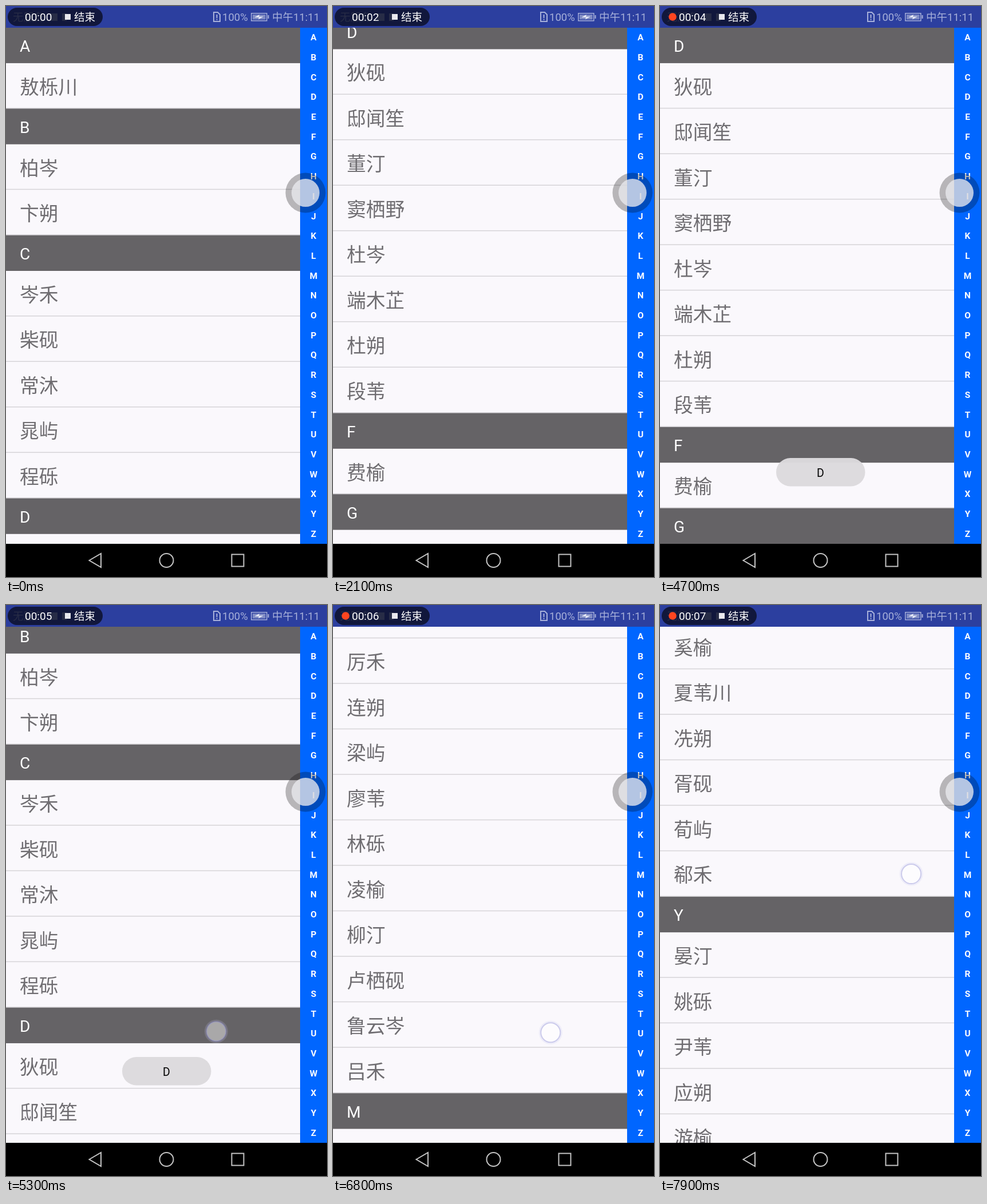
An HTML page with a canvas for the animation above (8000 ms loop, 561 by 998 pixels).

```html
<!DOCTYPE html>
<html lang="zh-CN">
<head>
<meta charset="utf-8">
<style>
html, body { margin: 0; width: 100%; height: 100%; overflow: hidden; background: #000; }
canvas { display: block; }
</style>
</head>
<body>
<canvas id="stage" width="561" height="998"></canvas>
<script>
const ctx = document.getElementById('stage').getContext('2d');
const LOOP = 8000, TOP = 37.6, BOTTOM = 940, HEAD = 62.3, ROW = 79.5;
const FONT = 'Roboto, "Noto Sans CJK SC", "Noto Sans CJK", sans-serif';
const ALPHABET = 'ABCDEFGHIJKLMNOPQRSTUVWXYZ';

const contacts = {
  A: '敖栎川',
  B: '柏岑,卞朔',
  C: '岑禾,柴砚,常沐,晁屿,程砾',
  D: '狄砚,邸闻笙,董汀,窦栖野,杜岑,端木芷,杜朔,段苇',
  F: '费榆',
  G: '龚栖梧,葛汀,耿朔,郜云屿,关 砾',
  H: '郝苇,韩云砾,贺汀,呼栖榆,胡闻屿,花砚,桓北岑,霍朔',
  J: '纪禾,焦屿,靳云苇',
  K: '孔砾,匡汀',
  L: '雷砚,李岑,李榆,李汀,厉禾,连朔,梁屿,廖苇,林砾,凌榆,柳汀,卢栖砚,鲁云岑,吕禾',
  M: '马砾,孟汀,穆榆,穆屿',
  O: '欧砚',
  P: '裴砾,彭苇',
  Q: '秦屿',
  R: '阮栖禾,阮云汀,阮北榆',
  S: '沙砚,邵岑,石砾,时汀,史苇,宋榆,宋屿,苏禾,索朔,孙砚,孙汀',
  T: '汤岑,陶云砾,佟屿,滕苇',
  W: ' 卫北朗,温砚,邬栖禾,巫汀,翁砾',
  X: '奚榆,夏苇川,冼朔,胥砚,荀屿,郗禾',
  Y: '晏汀,姚砾,尹苇,应朔,游榆,郁云岑,袁砚',
  Z: '詹禾,张屿,郑汀,周砾,朱苇,邹榆'
};

const items = [], sectionY = {};
let listY = 0;
for (const [letter, names] of Object.entries(contacts)) {
  sectionY[letter] = listY;
  items.push({ text: letter, y: listY, head: true });
  listY += HEAD;
  for (const text of names.split(',')) {
    items.push({ text, y: listY });
    listY += ROW;
  }
}

// [time, scroll, power]: positive power eases in, negative eases out
const w = sectionY.W, d = sectionY.D;
const scrollKeys = [
  [0, 0], [850, 0], [1300, 211], [1500, 305], [2400, 900, -2.2],
  [2900, 900], [2900, d], [4720, d], [5300, 158], [5340, 112], [5480, 112],
  [5760, 532], [6200, 1346.5, -1.3], [6300, 1420], [6480, 1840],
  [6800, 3700, -1.2], [6950, 4120], [7330, w - 254, -1.3],
  [7400, w - 184.4], [7460, w - 124], [7760, w + 284, -1.2],
  [7900, w + 525.2], [8000, w + 690]
];

// [start, x, y, end, x, y]
const touches = [
  [850, 400, 668, 1500, 433, 360],
  [2700, 550, 158, 3450, 550, 158],
  [4720, 403, 79, 5340, 365, 790],
  [5480, 375, 800, 5760, 420, 380],
  [6300, 380, 750, 6480, 420, 330],
  [6800, 380, 750, 6950, 420, 330],
  [7330, 385, 620, 7460, 398, 489],
  [7760, 432, 640, 7960, 442, 399]
];

const clamp = v => Math.max(0, Math.min(1, v));
const mix = (a, b, u) => a + (b - a) * u;

function scrollAt(t) {
  const i = scrollKeys.findIndex(k => k[0] > t);
  const [t0, y0] = scrollKeys[i - 1], [t1, y1, power = 1] = scrollKeys[i];
  const u = (t - t0) / (t1 - t0);
  return mix(y0, y1, power > 0 ? u ** power : 1 - (1 - u) ** -power);
}

function rect(x, y, width, height, color) {
  ctx.fillStyle = color;
  ctx.fillRect(x, y, width, height);
}

function pill(x, y, width, height, r, color) {
  ctx.fillStyle = color;
  ctx.beginPath();
  ctx.roundRect(x, y, width, height, r);
  ctx.fill();
}

function disc(x, y, r, fill, stroke, line = 2) {
  ctx.beginPath();
  ctx.arc(x, y, r, 0, 7);
  if (fill) { ctx.fillStyle = fill; ctx.fill(); }
  if (stroke) { ctx.strokeStyle = stroke; ctx.lineWidth = line; ctx.stroke(); }
}

function label(text, x, y, size, color, weight = 400, align = 'left') {
  ctx.font = `${weight} ${size}px ${FONT}`;
  ctx.textAlign = align;
  ctx.fillStyle = color;
  ctx.fillText(text, x, y);
}

function poly(points, color, fill) {
  ctx.beginPath();
  points.forEach(([x, y]) => ctx.lineTo(x, y));
  ctx.closePath();
  ctx.strokeStyle = ctx.fillStyle = color;
  ctx.lineWidth = 2;
  fill ? ctx.fill() : ctx.stroke();
}

function drawList(scroll) {
  rect(0, TOP, 514, BOTTOM - TOP, '#faf8fc');
  for (const { text, y, head } of items) {
    const top = TOP + y - scroll;
    if (top > BOTTOM || top + ROW < TOP) continue;
    if (head) {
      rect(0, top, 514, HEAD, '#656366');
      label(text, 24, top + 42.4, 28, '#fff');
    } else {
      rect(0, top + ROW - 1.5, 514, 1.5, '#d6d4d8');
      label(text, 24, top + 53.9, 33.7, '#6f6d71');
    }
  }
}

function drawIndex() {
  rect(514, TOP, 47, BOTTOM - TOP, '#0066ff');
  [...ALPHABET].forEach((c, i) =>
    label(c, 537.5, 60.2 + i * 34.7, 15.5, '#fff', 700, 'center'));
  disc(523.5, 326.5, 35, 'rgba(0,0,0,.27)');
  disc(523.5, 326.5, 24.5, 'rgba(235,235,240,.77)');
}

function drawStatus(t) {
  const ink = '#a7b0da';
  rect(0, 0, 561, 38, '#2c3f9f');
  label('无服务', 12, 26, 18.5, ink);
  rect(77, 13, 13, 13, ink);
  rect(98, 13, 8, 13, ink);
  pill(3, 3, 166, 32, 16, 'rgba(12,15,38,.82)');
  if (t % 1000 >= 500) disc(22, 19, 6.8, '#ff4520');
  label('00:0' + Math.floor(t / 1000), 33, 26, 19, '#fff');
  rect(103, 14, 10, 10, '#e8e8ee');
  label('结束', 119, 26, 18.5, '#fff');

  poly([[363, 11], [370, 11], [374, 15], [374, 27], [363, 27]], ink);
  rect(367.5, 15, 2, 6, ink);
  rect(367.5, 22.5, 2, 2, ink);
  label('100%', 378, 26, 18.5, ink);
  ctx.strokeStyle = ink;
  ctx.lineWidth = 1.5;
  ctx.strokeRect(428.8, 12.8, 27, 13);
  rect(431, 15, 22.6, 8.6, '#7f8bc4');
  rect(457.5, 16, 2, 6, ink);
  poly([[434, 20], [443, 15], [442, 18.5], [450, 18.5], [441, 23.5], [442, 20]], '#e4e7f5', true);
  label('中午11:11', 465, 26, 18.5, ink);
}

function drawNav() {
  const ink = '#c4c4c4';
  rect(0, BOTTOM, 561, 58, '#000');
  poly([[145.5, 969], [166, 957], [166, 981]], ink);
  disc(280.5, 969, 12, null, ink);
  poly([[394.5, 958.5], [415.5, 958.5], [415.5, 979.5], [394.5, 979.5]], ink);
}

function drawToast(t) {
  ctx.globalAlpha = clamp((t - 2900) / 150) * clamp((5800 - t) / 200);
  pill(203, 790, 155.5, 49.5, 24.7, 'rgba(220,218,221,.97)');
  label('D', 280.3, 822.5, 19.5, '#000', 400, 'center');
  ctx.globalAlpha = 1;
}

function drawTouch(t) {
  for (const [t0, x0, y0, t1, x1, y1] of touches) {
    if (t < t0 || t > t1) continue;
    const u = (t - t0) / (t1 - t0), x = mix(x0, x1, u), y = mix(y0, y1, u);
    disc(x, y, 19, null, 'rgba(190,190,235,.2)', 3);
    disc(x, y, 17, 'rgba(255,255,255,.44)', 'rgba(150,150,215,.45)');
  }
}

function frame(now) {
  const t = now % LOOP;
  drawList(scrollAt(t));
  drawIndex();
  drawToast(t);
  drawNav();
  drawStatus(t);
  drawTouch(t);
  requestAnimationFrame(frame);
}
requestAnimationFrame(frame);
</script>
</body>
</html>
```
